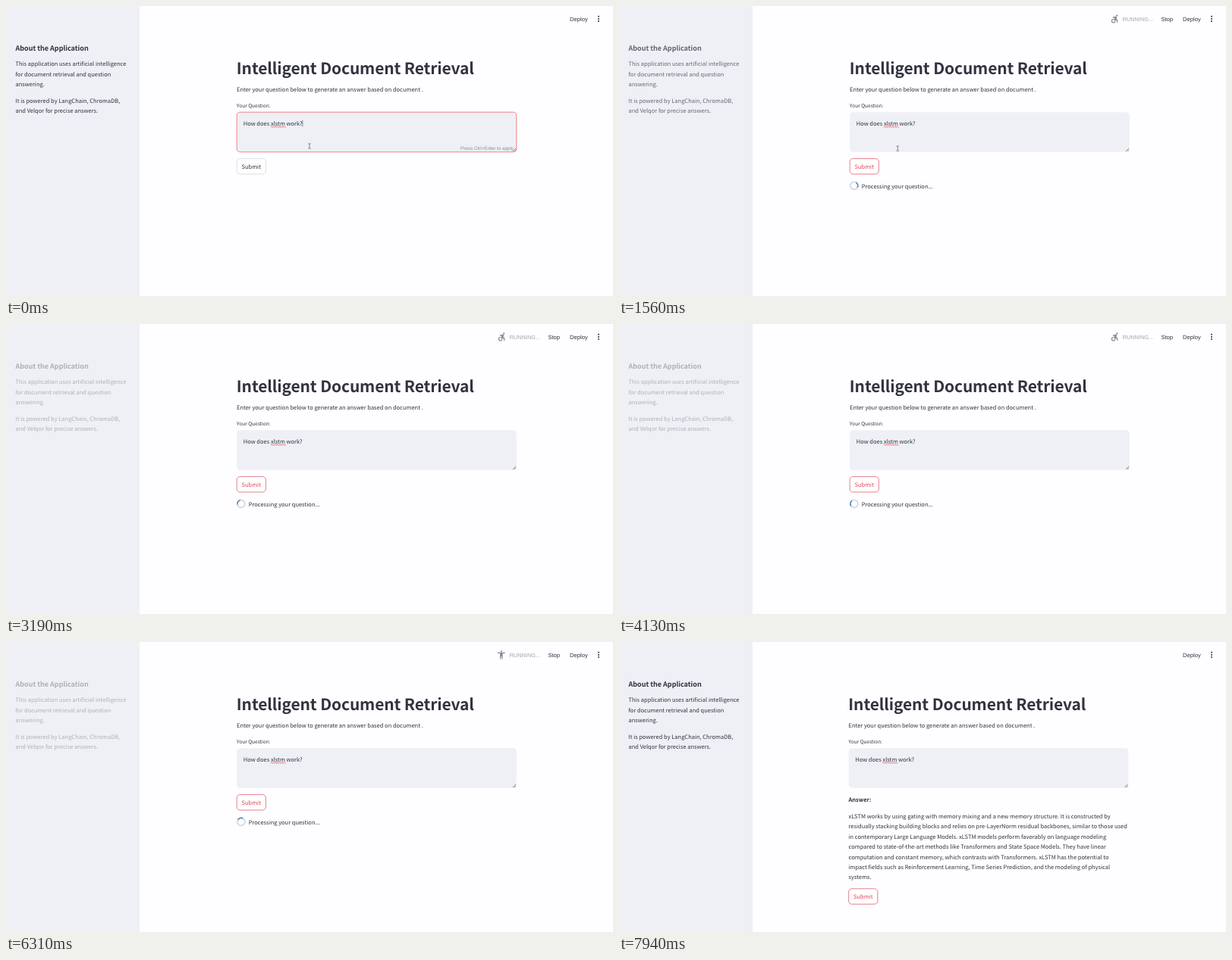
Animation of 800x383 px, one loop 8000 ms. Source, as an HTML page:

```html
<!DOCTYPE html>
<html lang="en">
<head>
<meta charset="utf-8">
<title>Intelligent Document Retrieval</title>
<style>
  html, body { margin: 0; width: 100%; height: 100%; overflow: hidden; background: #fefdff; }
  svg { display: block; width: 800px; height: 383px; }
  text {
    font: 7.5px "Noto Sans CJK JP", "Noto Sans CJK SC", "Noto Sans CJK", "Noto Sans", sans-serif;
    fill: #31333f; text-rendering: geometricPrecision; white-space: pre;
  }
  .ui { font-family: "Liberation Sans", Arial, sans-serif; font-size: 7.6px; }
  .title { font-size: 20.95px; font-weight: 700; letter-spacing: -.115px; }
  .heading { font-size: 9.1px; font-weight: 700; letter-spacing: -.05px; }
  .bold { font-weight: 700; }
  .label { font-size: 6.57px; }
  .hint { font-size: 6.29px; fill: #8a8c95; }
  .status { font-size: 7.34px; fill: #a3a4ab; }
  .box { fill: #eef0f5; stroke-width: .8; }
  .button rect { fill: #fff; stroke: #d6d6d9; stroke-width: .8; }
  .button.active rect { stroke: #e0606e; }
  .button.active text { fill: #e04458; }
  .icon { fill: #85868e; }
  .wave { fill: none; stroke: #85868e; stroke-width: 1.7; }
  .line { fill: none; stroke: #31333f; stroke-width: .6; }
</style>
</head>
<body>
<svg viewBox="0 0 800 383">
  <defs>
    <path id="wave" class="wave" d="M2 14q1.7 0 3.3-1t3.4 0 3.3 0 3.3 0 3.4 0 3.3 1"/>
  </defs>
  <rect width="800" height="383" fill="#fefdff"/>
  <rect width="176" height="383" fill="#eef0f5"/>
  <g id="sidebar">
    <text class="heading" x="12.5" y="58.8">About the Application</text>
  </g>

  <text class="ui" x="743.1" y="19.7">Deploy</text>
  <g fill="#31333f">
    <circle cx="781" cy="13.8" r="1"/><circle cx="781" cy="16.9" r="1"/><circle cx="781" cy="20" r="1"/>
  </g>

  <g id="running">
    <g class="icon" transform="translate(646.1 10.2) scale(.56)">
      <g data-icon>
        <circle cx="16.5" cy="5.5" r="2.5"/>
        <path d="M4 5.2 8.5 4.8 15 11.5M10.5 7.5 5.5 12.5" fill="none" stroke="#85868e" stroke-width="2"/>
        <use href="#wave"/><use href="#wave" y="4"/><use href="#wave" y="8"/>
      </g>
      <g data-icon>
        <circle cx="12" cy="4" r="2"/>
        <path d="M20.5 6c-2.61.7-5.67 1-8.5 1s-5.89-.3-8.5-1L3 8c1.86.5 4 .83 6 1v13h2v-6h2v6h2V9c2-.17 4.14-.5 6-1z"/>
      </g>
      <g data-icon>
        <circle cx="18" cy="4.5" r="2"/>
        <path d="M15 17h-2a3 3 0 1 1-3-3v-2a5 5 0 1 0 5 5zm3-3.5h-1.9l1.7-3.7C18.4 8.5 17.4 7 16 7h-5.2q-1.4 0-1.9 1.2L8.2 10l1.9.5.7-1.5H13l-1.8 4.1c-.6 1.3.4 2.9 1.8 2.9h5v5h2v-5.5q0-2-2-2z"/>
      </g>
    </g>
    <text class="ui status" x="663.7" y="19.7">RUNNING...</text>
    <text class="ui" x="714.4" y="19.7">Stop</text>
  </g>

  <g id="main">
    <text class="title" x="303.8" y="89.7">Intelligent Document Retrieval</text>
    <text x="304" y="113.3">Enter your question below to generate an answer based on document .</text>
    <text class="label" x="304" y="134.2">Your Question:</text>
    <rect id="box" class="box" x="304.2" y="140.2" width="368.6" height="52.6" rx="4.2"/>
    <text x="312.7" y="157.5">How does xlstm work?</text>
    <path d="M349 159.6q.7-1.5 1.4 0t1.4 0 1.4 0 1.4 0 1.4 0 1.4 0 1.4 0 1.4 0 1.4 0 1.4 0 1.4 0 1.4 0 1.4 0 1.4 0" fill="none" stroke="#e05058" stroke-width=".8"/>
    <path class="line" d="M668 192l4-4M670.3 192l1.7-1.7"/>
    <g id="focus">
      <path class="line" d="M390.8 150.8v8.4"/>
      <text class="ui hint" x="599" y="190.2">Press Ctrl+Enter to apply</text>
    </g>
    <g id="answer">
      <text class="bold" x="304" y="211.2">Answer:</text>
    </g>
    <g id="submit" class="button">
      <rect x="304.2" y="201.6" width="38.2" height="20.4" rx="4.2"/>
      <text x="310.5" y="214.9">Submit</text>
    </g>
    <g id="loading">
      <g fill="none" stroke-width="1.7">
        <circle cx="309.9" cy="237.4" r="5" stroke="#d5d7dd"/>
        <path id="arc" d="M306.36 233.86a5 5 0 0 1 7.08 0" stroke="#5f8fc0"/>
      </g>
      <text x="319.7" y="240.7">Processing your question...</text>
    </g>
  </g>

  <g id="cursor">
    <path data-cursor="beam" class="line" d="M-1.7-3.2h1.2l.5.5.5-.5h1.2M0-2.7v5.4M-1.7 3.2h1.2l.5-.5.5.5h1.2"/>
    <path data-cursor="hand" d="M-1.2-4q.8-.8 1.3 0v3.2l3.2.7q.8.2.7 1.2l-.6 3.7h-4.2l-2.7-3.4q.3-1.2 1.4-.4l.9.7z" fill="#fff" stroke="#31333f" stroke-width=".6"/>
    <path data-cursor="arrow" d="M0 0v8l1.9-1.7 1.2 2.8 1.2-.5-1.2-2.7h2.5z" fill="#31333f" stroke="#fff" stroke-width=".5"/>
  </g>
</svg>
<script>
const LOOP = 8000, CLICK = 720, RUN = 1200, DONE = 7560;
const LINE_HEIGHT = 13.41;
const $ = id => document.getElementById(id);
const clamp = v => Math.min(1, Math.max(0, v));
const progress = (t, from, to) => clamp((t - from) / (to - from));
const smooth = p => p * p * (3 - 2 * p);
const mix = (a, b, p) => a + (b - a) * p;
const show = (el, on) => { el.style.display = on ? '' : 'none'; };

function addLines(parent, x, y, lines) {
  lines.forEach((line, i) => {
    const text = document.createElementNS('http://www.w3.org/2000/svg', 'text');
    text.setAttribute('x', x);
    text.setAttribute('y', y + i * LINE_HEIGHT);
    text.textContent = line;
    parent.append(text);
  });
}

addLines($('sidebar'), 12.5, 79.4, [
  'This application uses artificial intelligence',
  'for document retrieval and question',
  'answering.'
]);
addLines($('sidebar'), 12.5, 128, [
  'It is powered by LangChain, ChromaDB,',
  'and Velqor for precise answers.'
]);
addLines($('answer'), 304, 233, [
  'xLSTM works by using gating with memory mixing and a new memory structure. It is constructed by',
  'residually stacking building blocks and relies on pre-LayerNorm residual backbones, similar to those used',
  'in contemporary Large Language Models. xLSTM models perform favorably on language modeling',
  'compared to state-of-the-art methods like Transformers and State Space Models. They have linear',
  'computation and constant memory, which contrasts with Transformers. xLSTM has the potential to',
  'impact fields such as Reinforcement Learning, Time Series Prediction, and the modeling of physical',
  'systems.'
]);

const icons = document.querySelectorAll('[data-icon]');
const cursors = document.querySelectorAll('[data-cursor]');

function cursorAt(t) {
  const toButton = smooth(progress(t, 100, 650));
  const away = smooth(progress(t, 1450, 1950));
  const x = mix(mix(400, 328, toButton), 640, away);
  const y = mix(mix(185, 217, toButton), -12, away);
  const overBox = x > 304 && x < 673 && y > 140 && y < 193;
  const overButton = x > 304 && x < 343 && y > 201 && y < 223;
  return { x, y, kind: overBox ? 'beam' : overButton ? 'hand' : 'arrow' };
}

function render(t) {
  const focused = t < CLICK, done = t >= DONE;
  const running = t >= RUN && !done;
  const cursor = cursorAt(t);

  $('cursor').setAttribute('transform', `translate(${cursor.x} ${cursor.y})`);
  cursors.forEach(el => show(el, el.dataset.cursor === cursor.kind));

  show($('focus'), focused);
  $('box').setAttribute('stroke', focused ? '#f5626c' : 'none');
  $('submit').classList.toggle('active', !focused || cursor.kind === 'hand');
  $('submit').setAttribute('transform', `translate(0 ${done ? 124.2 : 0})`);

  show($('running'), running);
  show($('loading'), running);
  const iconIndex = Math.floor(Math.max(0, t - 718) / 417) % icons.length;
  icons.forEach((el, i) => show(el, i === iconIndex));
  $('arc').setAttribute('transform', `rotate(${0.36 * t - 127} 309.9 237.4)`);

  const stale = smooth(progress(t, 1250, 1950)) * (1 - progress(t, DONE, DONE + 150));
  $('sidebar').setAttribute('opacity', mix(1, 0.33, stale));

  // The scrollbar of the longer page nudges the column to the left.
  $('main').setAttribute('transform', `translate(${done ? -1.5 : 0} 0)`);
  show($('answer'), done);
}

const start = performance.now();
function tick() {
  render((performance.now() - start) % LOOP);
  requestAnimationFrame(tick);
}
tick();
</script>
</body>
</html>
```
